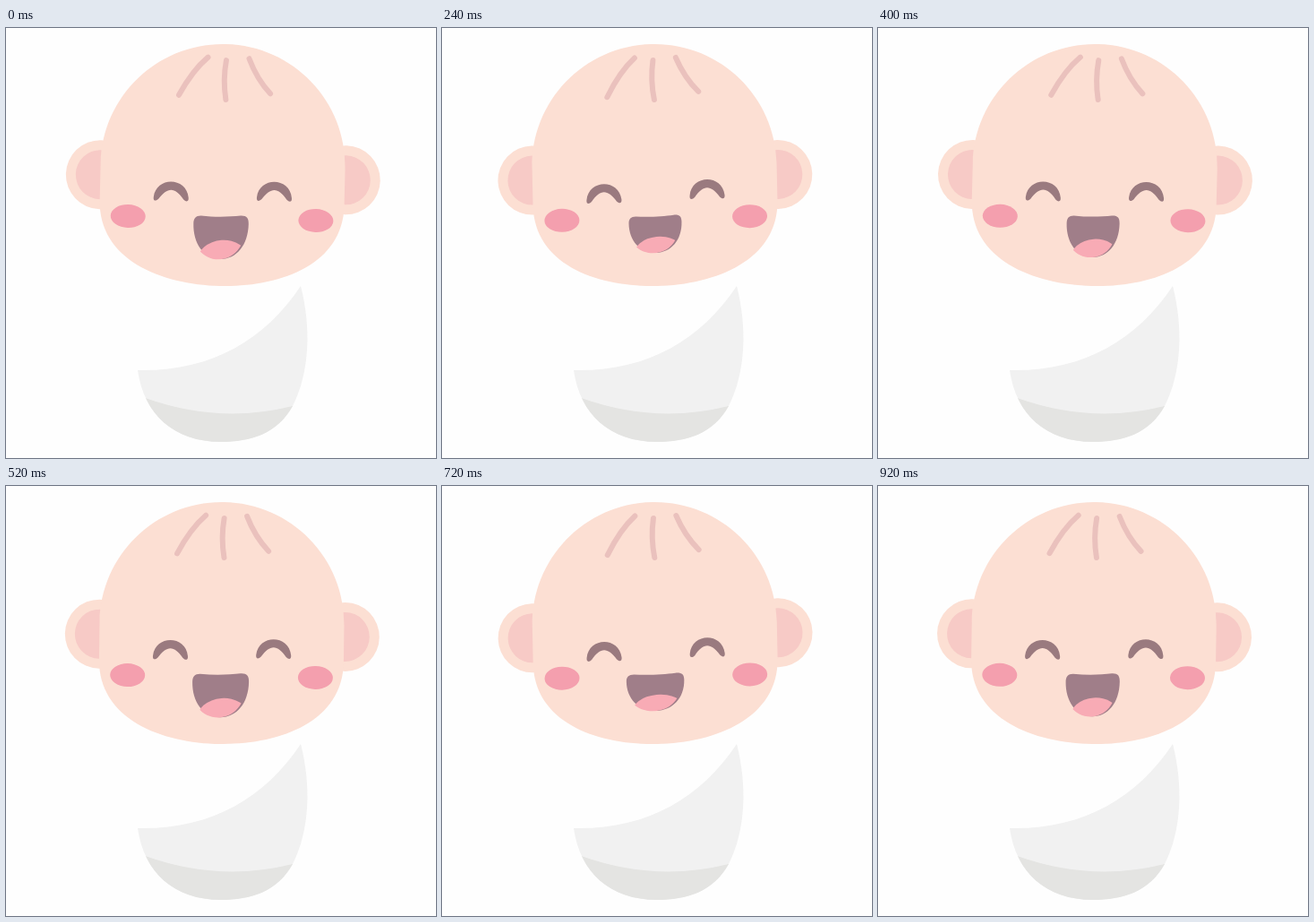
Animation of 480 by 480 pixels, one loop 0.96 s. Source, as an HTML page:

```html
<!DOCTYPE html>
<html lang="en">
<head>
<meta charset="utf-8">
<title>Laughing baby</title>
<style>
  html, body { margin: 0; width: 100%; height: 100%; overflow: hidden; background: #fefefe; }
  svg { display: block; width: 100vw; height: 100vh; }
  .skin { fill: #fcdfd3; }
  .inner { fill: #f7cac6; }
  .cheek { fill: #f49fae; }
  .hair { fill: none; stroke: #eac1bd; stroke-width: 6; stroke-linecap: round; }
  .eye { fill: #9a7a7f; }
</style>
</head>
<body>
<svg viewBox="0 0 480 480">
  <defs>
    <path id="body" d="M329 288C341 335 339 385 320 422C303 453 273 462 240 462C188 462 154 432 147 382C226 384 288 350 329 288Z"/>
    <path id="lips" d="M207.5 219C207.5 213 210 210 216 210C232 211.5 249 210.5 261 209C268 208.500 270.500 211 270.500 218C270.500 242 257 257.500 239 257.500C220 257.500 207.500 241 207.500 219Z"/>
    <path id="eye" d="M-19.500 18C-17-5.500 17-5.500 19.500 18C20 22.500 17 23 14 20C4 6-4 6-14 20C-17 23-20 22.500-19.500 18Z"/>
    <clipPath id="bodyClip"><use href="#body"/></clipPath>
    <clipPath id="lipsClip"><use href="#lips"/></clipPath>
  </defs>

  <use href="#body" fill="#f1f1f1"/>
  <path d="M140 407L155.500 413Q238 442.500 320 422L345 415V470H140Z" fill="#e4e4e2" clip-path="url(#bodyClip)"/>

  <g id="head">
    <circle class="skin" cx="103" cy="167" r="38.500"/>
    <circle class="skin" cx="377" cy="166.500" r="38.500"/>
    <circle class="inner" cx="103" cy="167" r="27.500"/>
    <circle class="inner" cx="377" cy="166.500" r="27.500"/>
    <path class="skin" d="M103 154C103 79 164 18 239.500 18S376 79 376 154V195C376 262 305 288 239.500 288S103 262 103 195Z"/>
    <path class="hair" d="M220 33Q203 48 188.500 76M240.500 36Q237 58 241 80M266 33.500Q275 56 290.500 72"/>
    <use class="eye" href="#eye" x="182.500" y="172.500"/>
    <use class="eye" href="#eye" x="297.700" y="170"/>
    <ellipse class="cheek" cx="135" cy="212.500" rx="19.500" ry="13"/>
    <ellipse class="cheek" cx="344.700" cy="212.500" rx="19.500" ry="13"/>
    <g id="mouth">
      <use href="#lips" fill="#a07e89"/>
      <ellipse cx="242" cy="258" rx="29" ry="21.500" fill="#f8abb5" transform="rotate(-5 242 258)" clip-path="url(#lipsClip)"/>
    </g>
  </g>
</svg>
<script>
const LOOP = 960, STEP = 40, CUT = 600;

// Each entry is [time in ms, value]; motion eases between neighbours.
const sway = [[-40, 1.6], [195, -1.55], [437, 1.65], [677, -1.6]];
const swayAfterCut = [[570, 1.5], [750, -1.35], [980, 1.35]];
const mouthHeight = [[-255, 41.3], [30, 48.7], [225, 41.3], [510, 48.7]];
const mouthWidth = [[-60, 60], [60, 63], [240, 59], [400, 59], [640, 67], [800, 62], [900, 60], [1020, 63]];

const head = document.getElementById("head");
const mouth = document.getElementById("mouth");

function ease(track, t) {
  const i = track.findIndex(([time]) => time > t);
  const [t0, a] = track[i - 1], [t1, b] = track[i];
  const u = (t - t0) / (t1 - t0);
  return a + (b - a) * (1 - Math.cos(Math.PI * u)) / 2;
}

function draw(now) {
  const t = Math.floor((now % LOOP) / STEP) * STEP;
  const angle = ease(t < CUT ? sway : swayAfterCut, t);
  const sx = ease(mouthWidth, t) / 63;
  const sy = ease(mouthHeight, t % (LOOP / 2)) / 48;
  head.setAttribute("transform", `rotate(${angle} 240 262)`);
  mouth.setAttribute("transform", `translate(239 210) scale(${sx} ${sy}) translate(-239 -210)`);
}

const start = performance.now();
function tick() {
  draw(performance.now() - start);
  requestAnimationFrame(tick);
}
tick();
</script>
</body>
</html>
```
